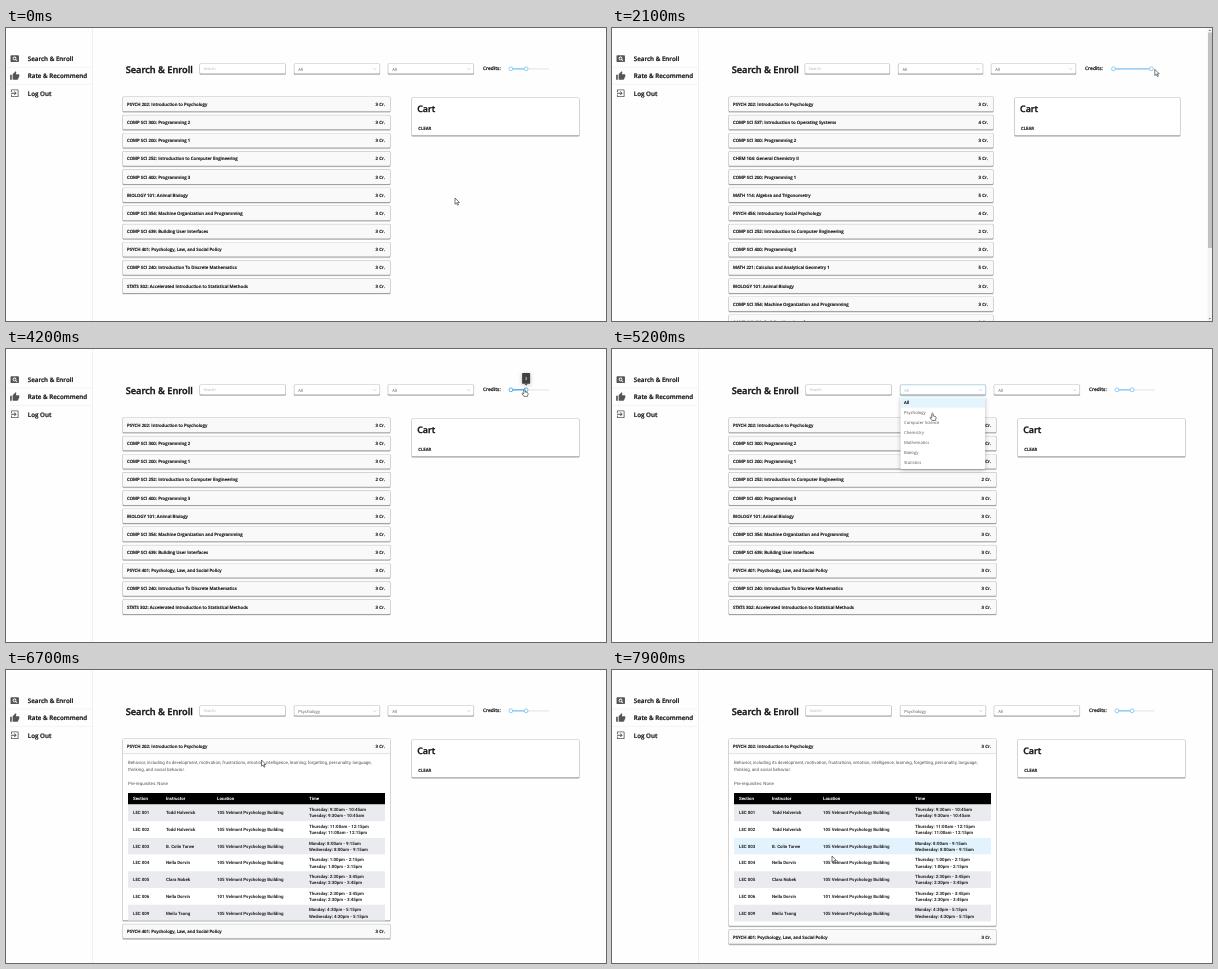
Animation, 600 px wide and 293 px high, one loop 8000 ms. Source, as an HTML page:

```html
<!DOCTYPE html>
<html lang="en">
<head>
<meta charset="utf-8">
<title>Search &amp; Enroll</title>
<style>
html, body { margin: 0; width: 100%; height: 100%; overflow: hidden; background: #fefefe; }
svg { display: block; }
#stage { width: 100%; height: 100%; }
text { font-family: "Open Sans", "Noto Sans", sans-serif; font-weight: 600; fill: #111; stroke: #111; stroke-width: .035em; text-rendering: geometricPrecision; white-space: pre; }
.plain, .hint, .body, .cell { stroke: none; }
.plain { font-weight: 400; fill: #555; }
.hint { font-weight: 400; fill: #b4b4b4; }
.body { font-family: Roboto, sans-serif; font-weight: 400; fill: #505050; }
.cell { font-family: Roboto, sans-serif; font-weight: 700; fill: #222; }
.white { fill: #fff; }
.menu { filter: drop-shadow(0 1px 2px rgba(0, 0, 0, .28)); }
</style>
</head>
<body>
<svg id="stage" viewBox="0 0 600 293">
  <g id="side"></g>
  <g id="page"></g>
  <g id="cursor" stroke="#333" stroke-width=".65" stroke-linejoin="round" fill="#fff">
    <path id="arrow" d="M0 0V6.2L1.5 4.9L2.5 7.2L3.5 6.8L2.5 4.5H4.4Z"/>
    <path id="hand" d="M-.7 .6Q0 -.5 .7 .6V3L3 3.5Q3.8 3.8 3.6 4.9L3 7.4H-.6L-2.6 4.6Q-2.4 3.6 -.7 4.8Z"/>
  </g>
</svg>
<script>
const LOOP = 8000, STEP = 100;
const TOP = 76.3, PITCH = 18.17, HALF = 7.3, BODY = 172.5;

const courses = [
  ["PSYCH 202: Introduction to Psychology", 3],
  ["COMP SCI 537: Introduction to Operating Systems", 4],
  ["COMP SCI 300: Programming 2", 3],
  ["CHEM 104: General Chemistry II", 5],
  ["COMP SCI 200: Programming 1", 3],
  ["MATH 114: Algebra and Trigonometry", 5],
  ["PSYCH 456: Introductory Social Psychology", 4],
  ["COMP SCI 252: Introduction to Computer Engineering", 2],
  ["COMP SCI 400: Programming 3", 3],
  ["MATH 221: Calculus and Analytical Geometry 1", 5],
  ["BIOLOGY 101: Animal Biology", 3],
  ["COMP SCI 354: Machine Organization and Programming", 3],
  ["COMP SCI 639: Building User Interfaces", 3],
  ["PSYCH 401: Psychology, Law, and Social Policy", 3],
  ["COMP SCI 240: Introduction To Discrete Mathematics", 3],
  ["STATS 302: Accelerated Introduction to Statistical Methods", 3]
];

const lectures = [
  ["001", "Todd Halverick", 105, "Thursday: 9:30am - 10:45am", "Tuesday: 9:30am - 10:45am"],
  ["002", "Todd Halverick", 105, "Thursday: 11:00am - 12:15pm", "Tuesday: 11:00am - 12:15pm"],
  ["003", "B. Colin Tarwe", 105, "Monday: 8:00am - 9:15am", "Wednesday: 8:00am - 9:15am"],
  ["004", "Nella Dorvin", 105, "Thursday: 1:00pm - 2:15pm", "Tuesday: 1:00pm - 2:15pm"],
  ["005", "Clara Nobek", 105, "Thursday: 2:30pm - 3:45pm", "Tuesday: 2:30pm - 3:45pm"],
  ["006", "Nella Dorvin", 101, "Thursday: 2:30pm - 3:45pm", "Tuesday: 2:30pm - 3:45pm"],
  ["009", "Meilu Tsong", 105, "Monday: 4:30pm - 5:15pm", "Wednesday: 4:30pm - 5:15pm"]
];

const subjects = ["All", "Psychology", "Computer Science", "Chemistry", "Mathematics", "Biology", "Statistics"];

// time, x, y of the pointer's tip
const path = [
  [0, 449, 170], [700, 520, 41], [900, 521, 41], [1200, 545, 41], [1400, 548, 41],
  [1800, 548, 42], [2300, 540, 41], [2500, 539, 41], [2900, 524, 42], [3000, 523, 42],
  [3600, 524, 42], [4000, 518.5, 40], [4300, 518.5, 40], [4800, 332, 40], [5000, 330, 41],
  [5200, 320.5, 64], [5500, 318, 63], [6200, 256, 76], [6400, 255.5, 78], [6700, 255.5, 90],
  [6800, 262, 95], [7000, 352, 160], [7100, 352, 160], [7400, 225, 222], [7500, 225, 222],
  [7700, 228, 139], [7900, 220, 186], [8000, 220, 186]
];

// time, value: each holds until the next
const sliderSteps = [[0, 3], [1000, 4], [1100, 5], [1200, 6], [2600, 5], [2800, 4], [3800, 3]];
const limitSteps = [[0, 3], [1600, 6], [3200, 4], [4200, 3]];
const tipSpans = [[700, 1900], [2300, 4400]];
const handSpans = [[700, 1300], [2300, 4400], [4700, 5600], [6100, 6500]];

const $ = id => document.getElementById(id);
const hold = (steps, t) => steps.filter(s => s[0] <= t).pop()[1];
const within = (spans, t) => spans.some(([a, b]) => t >= a && t < b);
const smooth = p => { p = Math.min(1, Math.max(0, p)); return p * p * (3 - 2 * p); };
const esc = s => String(s).replace(/&/g, "&amp;");

const text = (x, y, s, size, cls = "", extra = "") =>
  `<text x="${x}" y="${y}" font-size="${size}" class="${cls}" ${extra}>${esc(s)}</text>`;
const rect = (x, y, w, h, fill, extra = "") =>
  `<rect x="${x}" y="${y}" width="${w}" height="${h}" fill="${fill}" ${extra}/>`;
const line = (x1, y1, x2, y2, color, width) =>
  `<path d="M${x1} ${y1}L${x2} ${y2}" stroke="${color}" stroke-width="${width}"/>`;

// a soft edge all round, heavier below
const card = (x, y, w, h, fill = "#fff") =>
  rect(x - .7, y - .4, w + 1.4, h + 2, "#000", 'rx="1.3" opacity=".13"') +
  rect(x - .3, y - .2, w + .6, h + 1.2, "#000", 'rx="1" opacity=".27"') +
  rect(x, y, w, h, fill, 'rx=".8"');

function sidebar() {
  const icons = [
    "M11.5 9a2.5 2.5 0 1 0 0 5a2.5 2.5 0 0 0 0-5zM20 4H4a2 2 0 0 0-2 2v12a2 2 0 0 0 2 2h16a2 2 0 0 0 2-2V6a2 2 0 0 0-2-2zM16.8 18.2L13.9 15.3A4.5 4.5 0 1 1 15.3 13.9L18.2 16.8z",
    "M1 21h4V9H1zM23 10a2 2 0 0 0-2-2h-6.3l1-4.6a1.5 1.5 0 0 0-.4-1.4L14.2 1L7.6 7.6A2 2 0 0 0 7 9v10a2 2 0 0 0 2 2h9a2 2 0 0 0 1.8-1.2l3-7a2 2 0 0 0 .2-.8z",
    "M10.1 15.6L11.5 17l5-5l-5-5l-1.4 1.4L12.7 11H3v2h9.7zM19 3H5a2 2 0 0 0-2 2v4h2V5h14v14H5v-4H3v4a2 2 0 0 0 2 2h14a2 2 0 0 0 2-2V5a2 2 0 0 0-2-2z"
  ];
  const labels = ["Search & Enroll", "Rate & Recommend", "Log Out"];
  return line(86.5, 0, 86.5, 293, "#e9e9e9", .7) +
    line(0, 39.2, 86, 39.2, "#ececec", .6) + line(0, 56.4, 86, 56.4, "#ececec", .6) +
    labels.map((s, i) => {
      const y = 30.6 + i * 17.3;
      return `<path transform="translate(3.7 ${y - 5}) scale(.42)" fill="#555" fill-rule="evenodd" d="${icons[i]}"/>` +
        text(21.8, y + 2.3, s, 6.24);
    }).join("");
}

function select(x, w, label, cls, open) {
  return card(x, 36, w, 9.4) +
    (open ? rect(x, 36, w, 9.4, "none", 'rx=".8" stroke="#9fd4f7" stroke-width=".5"') : "") +
    text(x + 4, 42.5, label, 4.2, cls) +
    `<path d="M${x + w - 6.4} 40.3l1.5 1.5l1.5-1.5" fill="none" stroke="#aaa" stroke-width=".5"/>`;
}

function slider(s) {
  const start = s.wide ? 504.9 : 501.4, at = v => start + (v - 1) * 7.6, y = 40.8;
  const color = s.tip ? "#42a8f0" : "#82c9f8";
  const knob = v => `<circle cx="${at(v)}" cy="${y}" r="1.9" fill="#fff" stroke="${color}" stroke-width=".9"/>`;
  let out = line(start, y, at(6), y, "#e8e8e8", 1.2) +
    line(start, y, at(s.value), y, color, 1.3) + knob(1) + knob(s.value);
  if (s.tip) {
    const x = at(s.value);
    out += rect(x - 4, 24, 8, 10.8, "#404040", 'rx=".6" class="menu"') +
      `<path d="M${x - 1.6} 34.7h3.2l-1.6 1.7z" fill="#404040"/>` +
      text(x, 30.6, s.value, 4.3, "plain white", 'text-anchor="middle"');
  }
  return out;
}

function details(hover) {
  const cols = [127, 160, 211, 303];
  const cells = (y, list) => list.map((s, i) => text(cols[i], y, s, 4.4, "cell")).join("");
  return text(122, 94, "Behavior, including its development, motivation, frustrations, emotion, intelligence, learning, forgetting, personality, language,", 4.44, "body") +
    text(122, 100.9, "thinking, and social behavior.", 4.44, "body") +
    text(122, 114.6, "Pre-requisites: None", 4.44, "body") +
    rect(122, 123, 257, 11.5, "#000") +
    ["Section", "Instructor", "Location", "Time"].map((s, i) => text(cols[i], 130.2, s, 4.4, "cell white")).join("") +
    lectures.map(([id, who, room, first, second], i) => {
      const y = 134.5 + i * 16.7, mid = y + 8.2;
      const fill = i === hover ? "#e3f3fd" : i % 2 ? "#fff" : "#e9ebee";
      return rect(122, y, 257, 16.7, fill) +
        cells(mid + 1.6, ["LEC " + id, who, room + " Velmont Psychology Building"]) +
        text(cols[3], mid - 1.5, first, 4.4, "cell") + text(cols[3], mid + 4.7, second, 4.4, "cell");
    }).join("");
}

function list(s) {
  const w = s.wide ? 267 : 264;
  const shown = courses.filter(([name, credits]) =>
    credits <= s.limit && (!s.filtered || name.startsWith("PSYCH")));
  return shown.map(([name, credits], i) => {
    const grow = i ? 0 : s.height, y = TOP + i * PITCH + (i ? s.height : 0), top = y - HALF;
    let out = card(117, top, w, HALF * 2 - .4 + grow, grow ? "#fff" : "#f9f9f9");
    if (grow) {
      const cut = y + HALF;
      out += rect(117, top, w, HALF * 2, "#fbfbfb") + line(117, cut, 117 + w, cut, "#d0d0d0", .6) +
        `<svg x="0" y="${cut}" width="600" height="${grow}" viewBox="0 ${cut} 600 ${grow}">${details(s.hover)}</svg>`;
    }
    return out + text(121, y + 1.6, name, 4.34) +
      text(112 + w, y + 1.6, credits + " Cr.", 4.34, "", 'text-anchor="end"');
  }).join("");
}

function menu() {
  return rect(288.5, 48, 84.5, 72, "#fff", 'rx=".8" class="menu"') +
    rect(288.5, 48.6, 84.5, 10, "#e4f4fd") +
    subjects.map((s, i) => text(292, 55 + i * 10.05, s, 4.2, i ? "plain" : "")).join("");
}

function scrollbar(limit) {
  const end = limit > 4 ? 220 : 270;
  return rect(595.5, 0, 4.5, 293, "#f3f3f3") + rect(596, 4.5, 4, end - 4.5, "#c1c1c1") +
    '<path d="M596.6 3h2.4l-1.2-1.5zM596.6 290h2.4l-1.2 1.5z" fill="#777"/>';
}

function page(s) {
  const scale = s.wide ? 1 : .989, px = x => 117 + (x - 117) * scale;
  const cartX = px(406), boxW = 85.3 * scale;
  return text(119.7, 45, "Search & Enroll", 9.22) +
    card(px(194), 36, boxW, 9.4) + text(px(194) + 3.4, 42.4, "Search", 3.95, "hint") +
    select(px(288.3), boxW, s.filtered ? "Psychology" : "All", s.open ? "hint" : "plain", s.open) +
    select(px(382.2), boxW, "All", "plain", false) +
    text(px(477), 41.5, "Credits:", 4.85) + slider(s) +
    card(cartX, 70, 167 * scale, 37.3) +
    text(cartX + 5.2, 83.9, "Cart", 8.9) + text(cartX + 6.2, 102, "CLEAR", 4.3, "cart") +
    list(s) + (s.open ? menu() : "") + (s.wide ? "" : scrollbar(s.limit));
}

function stateAt(t) {
  const limit = hold(limitSteps, t);
  return {
    limit, wide: limit === 3, value: hold(sliderSteps, t), tip: within(tipSpans, t),
    open: t >= 5000 && t < 5500, filtered: t >= 5500,
    height: BODY * smooth((t - 6400) / 336), hover: t >= 7700 ? 2 : -1
  };
}

function pointerAt(t) {
  const i = path.findIndex(p => p[0] > t), a = path[i - 1], b = path[i];
  const p = smooth((t - a[0]) / (b[0] - a[0]));
  return [a[1] + (b[1] - a[1]) * p, a[2] + (b[2] - a[2]) * p];
}

let last = "";
function draw(t) {
  const state = stateAt(t), key = JSON.stringify(state);
  if (key !== last) $("page").innerHTML = page(state);
  last = key;
  const hand = within(handSpans, t);
  $("arrow").style.display = hand ? "none" : "";
  $("hand").style.display = hand ? "" : "none";
  $("cursor").setAttribute("transform", `translate(${pointerAt(t).join(" ")})`);
}

$("side").innerHTML = sidebar();
const began = performance.now();
function tick() {
  const t = (performance.now() - began) % LOOP;
  draw(Math.floor(t / STEP) * STEP);
  requestAnimationFrame(tick);
}
tick();
</script>
</body>
</html>
```
